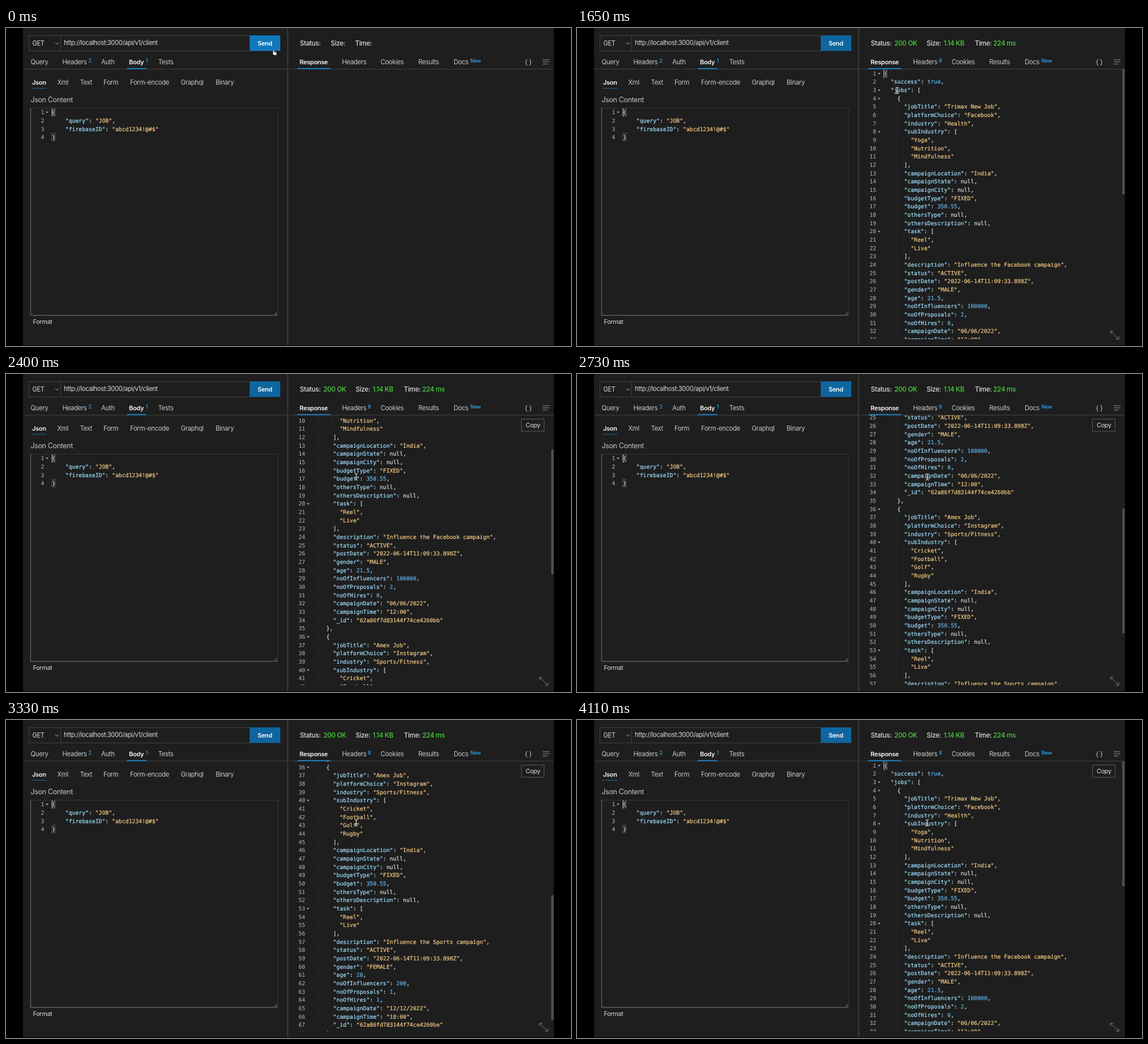
An HTML page for the animation above (4.71 s loop, 997x561 px).

```html
<!DOCTYPE html>
<html lang="en">
<head>
<meta charset="utf-8">
<title>API client</title>
<style>
  html, body { margin: 0; width: 100%; height: 100%; overflow: hidden; background: #000; }
  svg { display: block; width: 997px; height: 561px; }
  text { white-space: pre; }
  .ui { font-family: Inter, Roboto, sans-serif; letter-spacing: -0.03em; }
  .code { font: 9.78px "DejaVu Sans Mono", "Liberation Mono", monospace; text-rendering: geometricPrecision; }
</style>
</head>
<body>
<svg id="stage" viewBox="0 0 997 561" xmlns="http://www.w3.org/2000/svg">
  <defs><clipPath id="view"><rect x="499" y="73" width="468" height="476"/></clipPath></defs>
</svg>
<script>
const NS = "http://www.w3.org/2000/svg";
const stage = document.getElementById("stage");
const LOOP = 4710, PITCH = 14.664, CHAR = 5.888;
const GREY = "#c8c8c8", LIGHT = "#dcdcdc", WHITE = "#f6f6f6", BLUE = "#1689d8", GREEN = "#48d23f";

function add(parent, tag, attrs, content) {
  const el = document.createElementNS(NS, tag);
  for (const key in attrs) el.setAttribute(key, attrs[key]);
  if (content !== undefined) el.textContent = content;
  return parent.appendChild(el);
}
const group = (parent, attrs = {}) => add(parent, "g", attrs);
const box = (parent, x, y, width, height, fill, stroke = "none") =>
  add(parent, "rect", { x, y, width, height, fill, stroke });
const line = (parent, d, stroke, width = 1) =>
  add(parent, "path", { d, stroke, "stroke-width": width, fill: "none" });
const label = (parent, x, y, str, size = 11.3, fill = GREY, weight = 400) =>
  add(parent, "text", { class: "ui", x, y, fill, "font-size": size, "font-weight": weight }, str);
const show = (el, on) => el.setAttribute("visibility", on ? "visible" : "hidden");
const place = (el, x, y) => el.setAttribute("transform", `translate(${x.toFixed(2)} ${y.toFixed(2)})`);

// Code listing
function tokenColor(token, isKey) {
  if (isKey) return "#9fe0ff";
  if (token[0] === '"') return "#f8cd85";
  if (/^(true|[\d.]+)$/.test(token)) return "#62b8f2";
  return "#e0e0e0";
}

function codeLine(parent, str, number, x, y, numberEnd) {
  const body = str.trimStart();
  add(parent, "text", { class: "code", x: numberEnd, y, fill: "#b8b8b8", "text-anchor": "end" }, number);
  const el = add(parent, "text", {
    class: "code", x: x + (str.length - body.length) * CHAR, y, "stroke-width": 0.2
  });
  for (const token of body.match(/"[^"]*"(?=:)|"[^"]*"|[\w.]+|[^\w"]+/g)) {
    const isKey = token[0] === '"' && body[body.indexOf(token) + token.length] === ":";
    const color = tokenColor(token, isKey);
    add(el, "tspan", { fill: color, stroke: color }, token);
  }
  if (/[{[]$/.test(body))
    add(parent, "path", { d: `M${numberEnd + 2.6} ${y - 4.6}h5l-2.5 3z`, fill: "#a0a0a0" });
}

function listing(parent, lines, x, top, numberEnd) {
  lines.forEach((str, i) => codeLine(parent, str, i + 1, x, top + i * PITCH, numberEnd));
}

function bracketMark(parent, x, y) {
  box(parent, x, y, 6, 13.6, "none", "#646464").setAttribute("stroke-width", 0.8);
}

function job(title, platform, industry, subs, topic, gender, age, counts, date, time, id) {
  const [noOfInfluencers, noOfProposals, noOfHires] = counts;
  return {
    jobTitle: title, platformChoice: platform, industry, subIndustry: subs,
    campaignLocation: "India", campaignState: null, campaignCity: null,
    budgetType: "FIXED", budget: 350.55, othersType: null, othersDescription: null,
    task: ["Reel", "Live"], description: `Influence the ${topic} campaign`,
    status: "ACTIVE", postDate: "2022-06-14T11:09:33.898Z", gender, age,
    noOfInfluencers, noOfProposals, noOfHires,
    campaignDate: date, campaignTime: time, _id: id
  };
}
const reply = {
  success: true,
  jobs: [
    job("Trimax New Job", "Facebook", "Health", ["Yoga", "Nutrition", "Mindfulness"], "Facebook",
      "MALE", 21.5, [100000, 2, 0], "06/06/2022", "12:00", "62a86f7d83144f74ce4260bb"),
    job("Amex Job", "Instagram", "Sports/Fitness", ["Cricket", "Football", "Golf", "Rugby"], "Sports",
      "FEMALE", 28, [200, 1, 1], "12/12/2022", "18:00", "62a86fd783144f74ce4260be")
  ]
};
const request = { query: "JOB", firebaseID: "abcd1234!@#$" };

// Window and dividers
box(stage, 30, 0, 937, 560, "#1e1e1e");
box(stage, 496.4, 0, 1.6, 560, "#414141");
line(stage, "M30 72.5H497M500 72.5H967", "#414141");

// Request bar
box(stage, 40.5, 13.5, 390, 27, "#1e1e1e", "#424242");
line(stage, "M96.5 13V41", "#424242");
label(stage, 46.5, 31, "GET", 11.1, LIGHT);
line(stage, "M87 25.7l3 3 3-3", "#c0c0c0");
label(stage, 102, 30, "http://localhost:3000/api/v1/client", 11.12, LIGHT);
const send = box(stage, 430, 13, 54, 27.5, "#0f659f");
label(stage, 444, 30.5, "Send", 10.9, "#fff", 600);

// Request tabs
const TAB_Y = 64;
[[43.5, "Query"], [99.5, "Headers"], [168, "Auth"], [268.5, "Tests"]]
  .forEach(([x, str]) => label(stage, x, TAB_Y, str));
label(stage, 217, TAB_Y, "Body", 11, WHITE, 600);
const badge = (parent, x, str) => label(parent, x, 61, str, 8.8, "#2a9be8", 600);
badge(stage, 145.5, "2");
badge(stage, 246.5, "1");
box(stage, 213, 70.8, 34.5, 1.7, BLUE);

[[90.5, "Xml"], [130.5, "Text"], [172, "Form"], [219, "Form-encode"], [308.5, "Graphql"], [370, "Binary"]]
  .forEach(([x, str]) => label(stage, x, 100, str));
label(stage, 46, 100, "Json", 11, WHITE, 600);
box(stage, 44.5, 105.8, 27, 1.1, "#1c6596");
label(stage, 43.5, 131.3, "Json Content", 12.5, "#c4c4c4");

// Request editor
line(stage, "M43.5 141.5H479.5V507", "#343434");
line(stage, "M43.5 141V506.9H479", "#6b6b6b", 1.2);
line(stage, "M473.5 505.5l4.5-4.5M476.3 505.7l2-2", "#a0a0a0", 0.8);
bracketMark(stage, 80.8, 142);
bracketMark(stage, 80.8, 185.6);
line(stage, "M81.5 142V156", "#d0d0d0");
listing(stage, JSON.stringify(request, null, 4).split("\n"), 81.2, 152.2, 67.3);
label(stage, 47.5, 521.5, "Format", 10.9, LIGHT);

// Response header
const heading = (parent, x, str, fill = LIGHT) => label(parent, x, 31, str, 11.7, fill, 550);
heading(stage, 518.5, "Status:");
const idleStatus = group(stage);
heading(idleStatus, 573, "Size:");
heading(idleStatus, 616, "Time:");
label(stage, 518, TAB_Y, "Response", 11, WHITE, 600);
[[593, "Headers"], [661, "Cookies"], [727.5, "Results"], [790, "Docs"]]
  .forEach(([x, str]) => label(stage, x, TAB_Y, str));
badge(stage, 819.5, "New");
box(stage, 514, 70.8, 58, 1.7, BLUE);
label(stage, 915.5, 64, "{ }", 11.5);
line(stage, "M947 56H959M947 59.8H959M947 63.6H955.5", "#a0a0a0", 0.9);

// Response
const result = group(stage);
heading(result, 560, "200 OK", GREEN);
heading(result, 617, "Size:");
heading(result, 647, "1.14 KB", GREEN);
heading(result, 702, "Time:");
heading(result, 734.5, "224 ms", GREEN);
badge(result, 638.5, "8");

const pane = group(result, { "clip-path": "url(#view)" });
const sheet = group(pane);
const replyLines = JSON.stringify(reply, null, 2).split("\n");
replyLines.forEach((str, i) => {
  const level = str.search(/\S/) / 2;
  for (let k = 1; k < level; k++)
    line(sheet, `M${541 + k * 2 * CHAR} ${73 + i * PITCH}v${PITCH}`, "#2a2a2a", 0.8);
});
bracketMark(sheet, 541.2, 73.8);
line(sheet, "M541.8 74V88", "#d0d0d0");
listing(sheet, replyLines, 541.8, 83.8, 528);

const thumb = box(result, 962, 73, 4.5, 220, "#4d4d4d");
line(result, "M942 535.5L955.5 548.5M941.5 540V535H946.5M956 544V549H951", "#8c8c8c", 0.9);

const copy = group(stage);
box(copy, 909.5, 79.5, 40, 21.5, "#1e1e1e", "#5a5a5a");
label(copy, 917, 94.2, "Copy", 10.9, "#e0e0e0");

// Pointers
const hand = group(stage);
add(hand, "path", {
  d: "M-1.6 -4.6q1.1-.8 1.6.5l.8 2.6 3 .8q1 .4 1 1.5l-.4 3.8h-4.6l-3-3.8q-.2-1.3 1.2-.8l.8.7-1.2-4z",
  fill: "#fff", stroke: "#111", "stroke-width": 0.7
});
const beam = group(stage);
const beamPath = "M-3 -5.7q2.6 0 3 1.4q.4-1.4 3-1.4M-3 5.7q2.6 0 3-1.4q.4 1.4 3 1.4M0-4.3V4.3M-1.6 1.7H1.6";
line(beam, beamPath, "#111", 2.4);
line(beam, beamPath, "#fff", 1.1);

// Smooth track through [time, value] points, at rest at peaks and both ends
function track(t, points) {
  const last = points.length - 1;
  if (t <= points[0][0]) return points[0][1];
  if (t >= points[last][0]) return points[last][1];
  const i = points.findIndex(p => p[0] > t) - 1;
  const slope = k => {
    if (k === 0 || k === last) return 0;
    const [a, b, c] = [points[k - 1], points[k], points[k + 1]];
    return (b[1] - a[1]) * (c[1] - b[1]) <= 0 ? 0 : (c[1] - a[1]) / (c[0] - a[0]);
  };
  const [t0, v0] = points[i], [t1, v1] = points[i + 1];
  const span = t1 - t0, u = (t - t0) / span, w = 1 - u;
  return w * w * (1 + 2 * u) * v0 + u * u * (3 - 2 * u) * v1
    + span * u * w * (w * slope(i) - u * slope(i + 1));
}

const SCROLL = [[2100, 0], [2400, 129.5], [2730, 354.8], [3180, 525], [3330, 510.5], [3870, 382.3], [4110, 0]];
const MOUSE_X = [[480, 473], [990, 484], [1500, 561], [1650, 565], [2070, 618]];
const MOUSE_Y = [[480, 43.5], [990, 49], [1500, 104], [1650, 110], [2070, 181.5]];

function draw(t) {
  const x = track(t, MOUSE_X), y = track(t, MOUSE_Y), scroll = track(t, SCROLL);
  const loaded = t >= 1200, onSend = t < 900;
  send.setAttribute("fill", onSend ? "#1177bb" : "#0f659f");
  show(idleStatus, !loaded);
  show(result, loaded);
  show(copy, t >= 1710);
  show(hand, onSend);
  show(beam, !onSend);
  place(hand, x, y);
  place(beam, x, y);
  place(sheet, 0, -scroll);
  thumb.setAttribute("y", (73 + scroll * 0.463).toFixed(2));
}

function tick(now) {
  draw(now % LOOP);
  requestAnimationFrame(tick);
}
draw(0);
requestAnimationFrame(tick);
</script>
</body>
</html>
```
